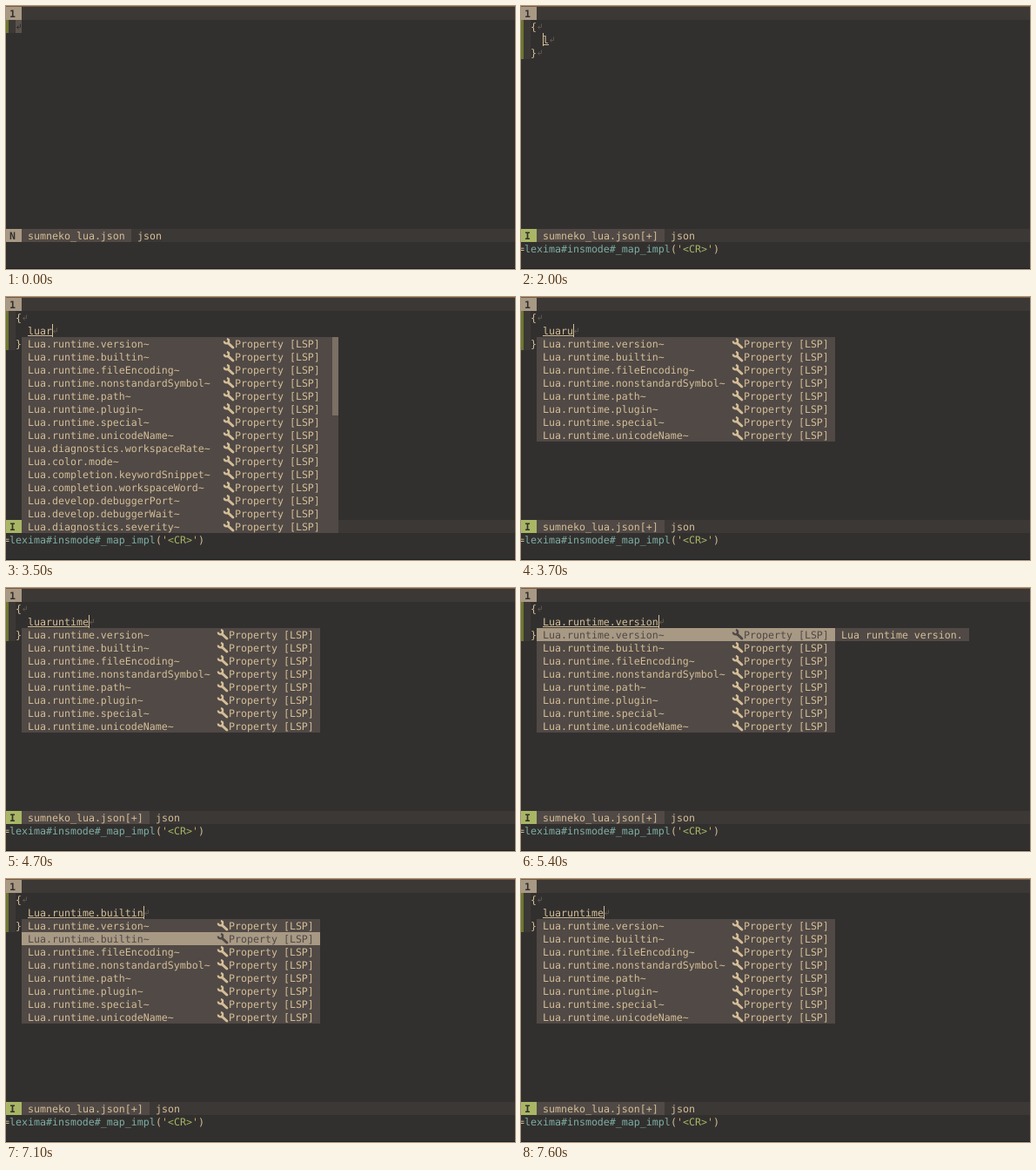
Animation of 585x302 px, one loop 8000 ms. Source, as an HTML page:

```html
<!DOCTYPE html>
<html lang="en">
<head>
<meta charset="utf-8">
<title>Completion in a terminal editor</title>
<style>
  html, body { margin: 0; width: 100%; height: 100%; overflow: hidden; background: #32302f; }
  svg { display: block; width: 585px; height: 302px; }
  text {
    font: 11.628px "DejaVu Sans Mono", monospace;
    white-space: pre;
    text-rendering: geometricPrecision;
  }
  .bold { font-weight: bold; }
</style>
</head>
<body>
<svg viewBox="0 0 585 302" xmlns="http://www.w3.org/2000/svg">
  <defs>
    <g id="wrench" fill="none" stroke="currentColor">
      <path d="M6.2 6.8 L11.8 12" stroke-width="3" stroke-linecap="round"/>
      <path d="M1.9 4.6 A2.6 2.6 0 1 0 4.9 2.2" stroke-width="2.3"/>
    </g>
  </defs>
  <g id="screen"></g>
</svg>
<script>
const LOOP = 8000, CELL = 7, LINE = 15;
const C = {
  bg: '#32302f', bar: '#3c3836', panel: '#504945', tan: '#a89984', thumb: '#7c6f64',
  fg: '#d4be98', dim: '#5a524c', green: '#a9b665', sign: '#6c782e',
  blue: '#7daea3', yellow: '#d8a657', edge: '#7d5a3c'
};

const runtime = ['version', 'builtin', 'fileEncoding', 'nonstandardSymbol',
  'path', 'plugin', 'special', 'unicodeName'].map(s => 'runtime.' + s);

// kind: column of the icon; thumb: scrollbar height in lines
const lists = {
  wide: {
    kind: 38, width: 54, thumb: 4,
    items: ['completion.callSnippet', 'runtime.version', 'color.mode',
      'completion.displayContext', 'completion.enable', 'completion.keywordSnippet',
      'completion.workspaceWord', 'develop.debuggerPort', 'develop.debuggerWait',
      'develop.enable', 'diagnostics.disable', 'diagnostics.enable',
      'diagnostics.globals', 'diagnostics.neededFileStatus', 'diagnostics.severity']
  },
  mid: {
    kind: 36, width: 52, thumb: 6,
    items: [...runtime, 'diagnostics.workspaceRate', 'color.mode',
      'completion.keywordSnippet', 'completion.workspaceWord', 'develop.debuggerPort',
      'develop.debuggerWait', 'diagnostics.severity']
  },
  narrow: { kind: 35, width: 49, thumb: 0, items: runtime }
};

const start = {
  mode: 'N', lines: [''], signs: 1, row: 1, cursor: 2, changed: false,
  call: false, word: '', list: null, pick: -1, doc: false
};
const type = word => ({ word, cursor: 4 + word.length });
const choose = pick => ({ pick, ...type('Lua.' + runtime[pick]) });

const steps = [
  [400, { mode: 'I' }],
  [800, { lines: ['{}'], cursor: 3, changed: true }],
  [1300, { lines: ['{', '  ', '}'], row: 2, cursor: 2, call: true }],
  [1400, { cursor: 4, signs: 3 }],
  [2000, { word: 'l' }],
  [2100, { list: 'wide', cursor: 5 }],
  [2300, type('lu')],
  [2600, { word: 'lua' }],
  [2700, type('lua')],
  [3500, { list: 'mid', ...type('luar') }],
  [3600, type('luaru')],
  [3700, { list: 'narrow' }],
  [3800, type('luarun')],
  [4100, type('luarunt')],
  [4300, type('luarunti')],
  [4500, type('luaruntim')],
  [4700, type('luaruntime')],
  [5300, choose(0)],
  [5400, { doc: true }],
  [6300, choose(1)],
  [6400, { doc: false }],
  [6700, choose(2)],
  [7100, choose(1)],
  [7300, { doc: true, ...choose(0) }],
  [7600, { doc: false, pick: -1, ...type('luaruntime') }]
];

// The character grid is shifted left by three pixels.
const colX = col => col * CELL - 3;
const rowY = row => row * LINE + 1;
const rect = (x, y, w, h, fill) =>
  `<rect x="${x}" y="${y}" width="${w}" height="${h}" fill="${fill}"/>`;
const fill = (col, row, cols, color, rows = 1) =>
  rect(colX(col), rowY(row), cols * CELL, rows * LINE, color);
const escape = s => s.replace(/&/g, '&amp;').replace(/</g, '&lt;');
const text = (col, row, str, color = C.fg, cls = '') =>
  `<text x="${colX(col)}" y="${rowY(row) + 12}" fill="${color}" class="${cls}">${escape(str)}</text>`;

function newline(col, row, color = C.dim) {
  const x = colX(col), y = rowY(row);
  return `<path d="M${x + 5.5} ${y + 4.5}V${y + 8.5}H${x + 1.5}m2 -2l-2 2l2 2"
    fill="none" stroke="${color}"/>`;
}

function buffer(s) {
  let out = fill(0, 1, 2, C.bar, s.lines.length) + rect(0, rowY(1), 3, s.signs * LINE, C.sign);
  const block = s.mode === 'N';
  if (block) out += fill(s.cursor, s.row, 1, C.dim);
  s.lines.forEach((line, i) => {
    const str = i === 1 ? line + s.word : line;
    out += text(2, i + 1, str) + newline(2 + str.length, i + 1, block ? C.bg : C.dim);
  });
  if (s.word) out += rect(colX(4), rowY(2) + 13, s.word.length * CELL, 1, C.fg);
  if (!block) out += rect(colX(s.cursor), rowY(s.row), 1, LINE, C.fg);
  return out;
}

function statusLine(s) {
  const name = 'sumneko_lua.json' + (s.changed ? '[+]' : '');
  const end = name.length + 5;
  return rect(0, rowY(17), 585, LINE, C.bar)
    + fill(0, 17, 3, s.mode === 'N' ? C.tan : C.green) + text(1, 17, s.mode, C.bg, 'bold')
    + fill(3, 17, end - 3, C.panel) + text(4, 17, name) + text(end + 1, 17, 'json');
}

function commandLine() {
  const parts = [['=', C.fg], ['lexima#insmode#_map_impl', C.blue], ['(', C.fg],
    ["'", C.yellow], ['<CR>', C.green], ["'", C.yellow], [')', C.fg]];
  let col = 0, out = '';
  for (const [str, color] of parts) {
    out += text(col, 18, str, color);
    col += str.length;
  }
  return out;
}

function menu(s) {
  const { kind, width, thumb, items } = lists[s.list];
  let out = fill(3, 3, width, C.panel, items.length);
  items.forEach((item, i) => {
    const row = i + 3, on = i === s.pick, color = on ? C.panel : C.fg;
    if (on) out += fill(3, row, width, C.tan);
    out += text(4, row, `Lua.${item}~`, color)
      + `<use href="#wrench" x="${colX(kind)}" y="${rowY(row)}" color="${color}"/>`
      + text(kind + 2, row, 'Property [LSP]', color);
  });
  if (thumb) out += fill(width + 2, 3, 1, C.thumb, thumb);
  if (s.doc) out += fill(width + 3, 3, 22, C.panel) + text(width + 4, 3, 'Lua runtime version.');
  return out;
}

function draw(s) {
  return rect(0, 0, 585, 302, C.bg)
    + rect(0, rowY(0), 585, LINE, C.bar) + fill(0, 0, 3, C.tan) + text(1, 0, '1', C.bg, 'bold')
    + rect(0, 0, 585, 1, C.edge) + rect(0, 301, 585, 1, '#1d2021')
    + buffer(s) + statusLine(s)
    + (s.call ? commandLine() : '') + (s.list ? menu(s) : '');
}

const screen = document.getElementById('screen');
const began = performance.now();
let shown = -1;

function update(now) {
  const t = Math.max(0, now - began) % LOOP;
  const past = steps.filter(([at]) => at <= t);
  if (past.length !== shown) {
    shown = past.length;
    screen.innerHTML = draw(Object.assign({}, start, ...past.map(([, change]) => change)));
  }
  requestAnimationFrame(update);
}
update(began);
</script>
</body>
</html>
```
